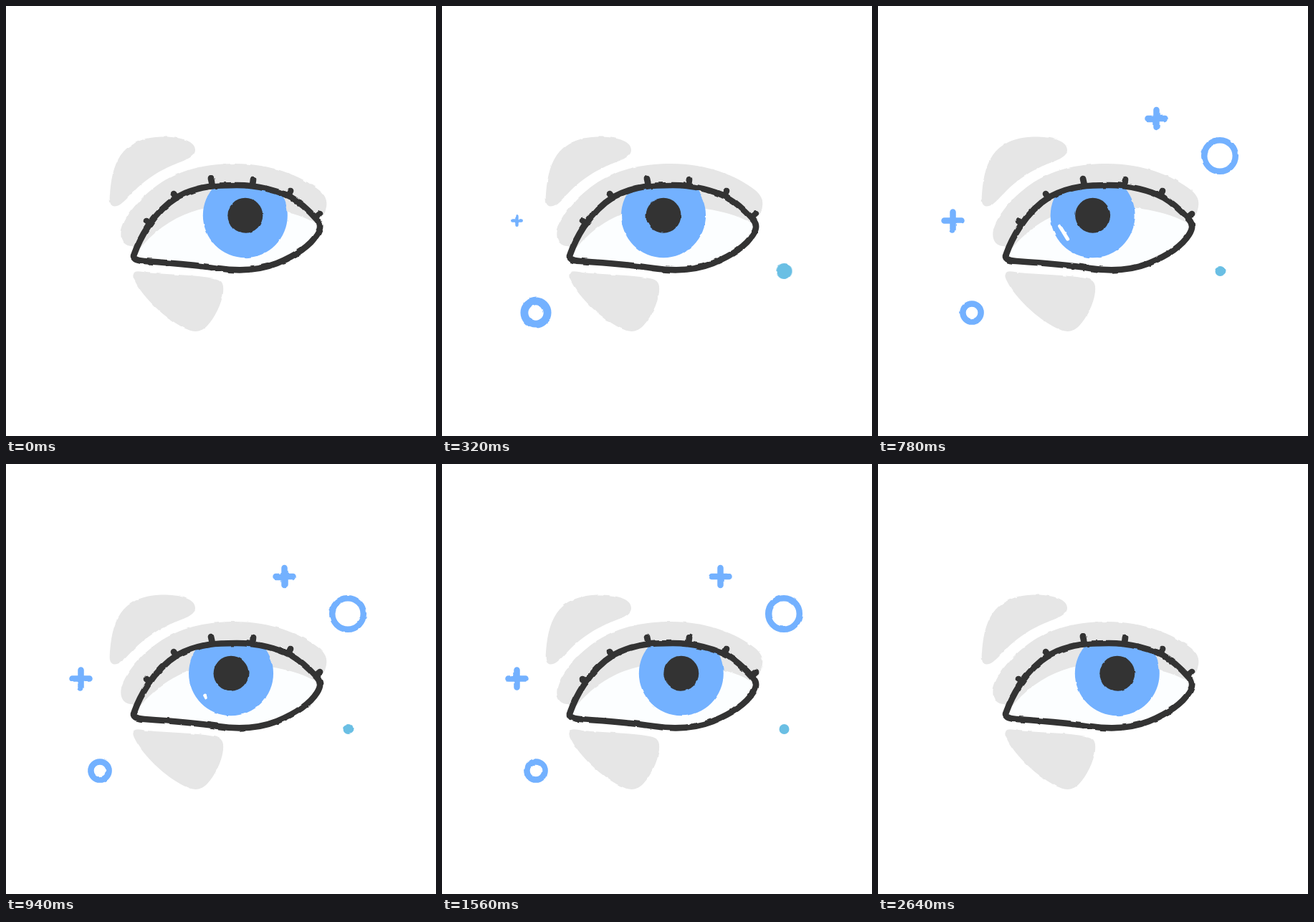
An HTML page for the animation above (2660 ms loop, 600x600 px).

```html
<!DOCTYPE html>
<html lang="en">
<head>
<meta charset="utf-8">
<title>Eye</title>
<style>
  html, body { margin: 0; width: 100%; height: 100%; overflow: hidden; background: #fff; }
  svg { display: block; width: 100vw; height: 100vh; }
  .line { fill: none; stroke-linecap: round; stroke-linejoin: round; }
</style>
</head>
<body>
<svg viewBox="0 0 600 600">
  <defs>
    <filter id="rough" filterUnits="userSpaceOnUse" x="0" y="0" width="600" height="600" color-interpolation-filters="sRGB">
      <feTurbulence type="fractalNoise" baseFrequency=".09" seed="4"/>
      <feColorMatrix id="boil" result="noise"/>
      <feDisplacementMap in="SourceGraphic" in2="noise" scale="3" xChannelSelector="R" yChannelSelector="G"/>
      <feGaussianBlur stdDeviation=".4"/>
    </filter>
    <path id="outline" d="M179 346C185 329 203 289 240 266C270 250 298 250 322 250C352 250 380 258 398 267C412 275 424 287 434 298C440 305 439 311 434 319C424 335 402 349 378 359C350 370 322 370 296 366C262 361 222 358 193 356C180 355 176 352 179 346Z"/>
    <clipPath id="opening"><use href="#outline"/></clipPath>
  </defs>
  <g filter="url(#rough)">
    <use href="#outline" fill="#fcfeff"/>
    <g fill="#e6e6e6">
      <path d="M145 262C147 236 152 217 164 203C179 187 200 182.500 220 182.500C240 182.500 264 187 264 201C264 213 242 217 226 225C207 234 192 245 180 257C168 269 160 279.500 152 279.500C145 279.500 144 273 145 262Z"/>
      <path d="M161 312C167 290 190 264 217 246C249 226 285 220 320 220C370 220 412 237 437 257C449 267 449 276 445 288L434 304C400 284 350 278 300 279C250 283 212 306 184 342L176 335C165 335 158 327 161 312Z"/>
      <path d="M178 374C179 369 186 370 196 372C228 375 262 375 290 380C302 382 304 388 303 399C301 416 291 435 281 446C271 456 262 456 248 449C222 436 190 406 179 382C177 378 177 376 178 374Z"/>
    </g>
    <g clip-path="url(#opening)">
      <g id="iris">
        <circle r="59" fill="#73b1ff"/>
        <circle r="24.5" fill="#333"/>
        <path id="glint" class="line" stroke="#fff" stroke-width="5"/>
      </g>
    </g>
    <g class="line" stroke="#333" stroke-width="8.7">
      <use href="#outline"/>
      <path d="M196 300l5 4M234 262l4 6M286 241l2 9M345 242l-1 8M397 258l-3 6M438 290l-6 5"/>
    </g>
    <g class="line" stroke="#73b1ff" stroke-width="8.5">
      <path id="plusLeft" d="M-12 0H12M0-12V12"/>
      <path id="plusTop" d="M-12 0H12M0-12V12"/>
      <circle id="ringLeft" r="12.6"/>
      <circle id="ringRight" r="21.8"/>
    </g>
    <circle id="dot" r="7" fill="#6abfe4"/>
  </g>
</svg>
<script>
const LOOP = 2660;
const $ = id => document.getElementById(id);
const ramp = (t, from, to) => {
  const u = Math.min(1, Math.max(0, (t - from) / (to - from)));
  return u * u * (3 - 2 * u);
};

// Each ornament pops to its peak scale, settles at 1 and shrinks away.
const ornaments = [
  { id: 'ringLeft', x: 131, y: 428, start: 110, peak: 1.28, end: 2260 },
  { id: 'dot', x: 477.5, y: 370, start: 120, peak: 1.58, end: 2300 },
  { id: 'plusLeft', x: 104.5, y: 299.5, start: 225, peak: 1.15, end: 2280 },
  { id: 'ringRight', x: 477, y: 209, start: 340, peak: 1.29, end: 2320 },
  { id: 'plusTop', x: 388.5, y: 157, start: 345, peak: 1.17, end: 2320 },
];

function popScale(t, { start, peak, end }) {
  return peak * ramp(t, start, start + 205)
    - (peak - 1) * ramp(t, start + 205, start + 350)
    - ramp(t, end, end + 300);
}

function drawGlint(t) {
  const head = ramp(t, 500, 700), tail = ramp(t, 800, 980);
  const at = u => `${-46 + 11 * u} ${15 + 18 * u}`;
  $('glint').setAttribute('d', head > tail ? `M${at(tail)}L${at(head)}` : '');
}

// Rotating through the noise channels makes the rough edges drift smoothly.
function boil(t) {
  const a = Math.cos(t / LOOP * 2 * Math.PI), b = Math.sin(t / LOOP * 2 * Math.PI);
  $('boil').setAttribute('values',
    `${a} 0 ${b} 0 ${(1 - a - b) / 2} 0 ${a} ${-b} 0 ${(1 - a + b) / 2} 0 0 0 0 0 0 0 0 0 1`);
}

function draw(t) {
  const x = 333.8 - 35 * (ramp(t, 0, 500) - ramp(t, 740, 1180));
  $('iris').setAttribute('transform', `translate(${x} 292.2)`);
  drawGlint(t);
  for (const o of ornaments) {
    const scale = popScale(t, o);
    $(o.id).setAttribute('transform', `translate(${o.x} ${o.y}) scale(${scale})`);
    $(o.id).setAttribute('visibility', scale > 0.001 ? 'visible' : 'hidden');
  }
  boil(t);
}

const begin = performance.now();
function tick() {
  draw((performance.now() - begin) % LOOP);
  requestAnimationFrame(tick);
}
tick();
</script>
</body>
</html>
```
